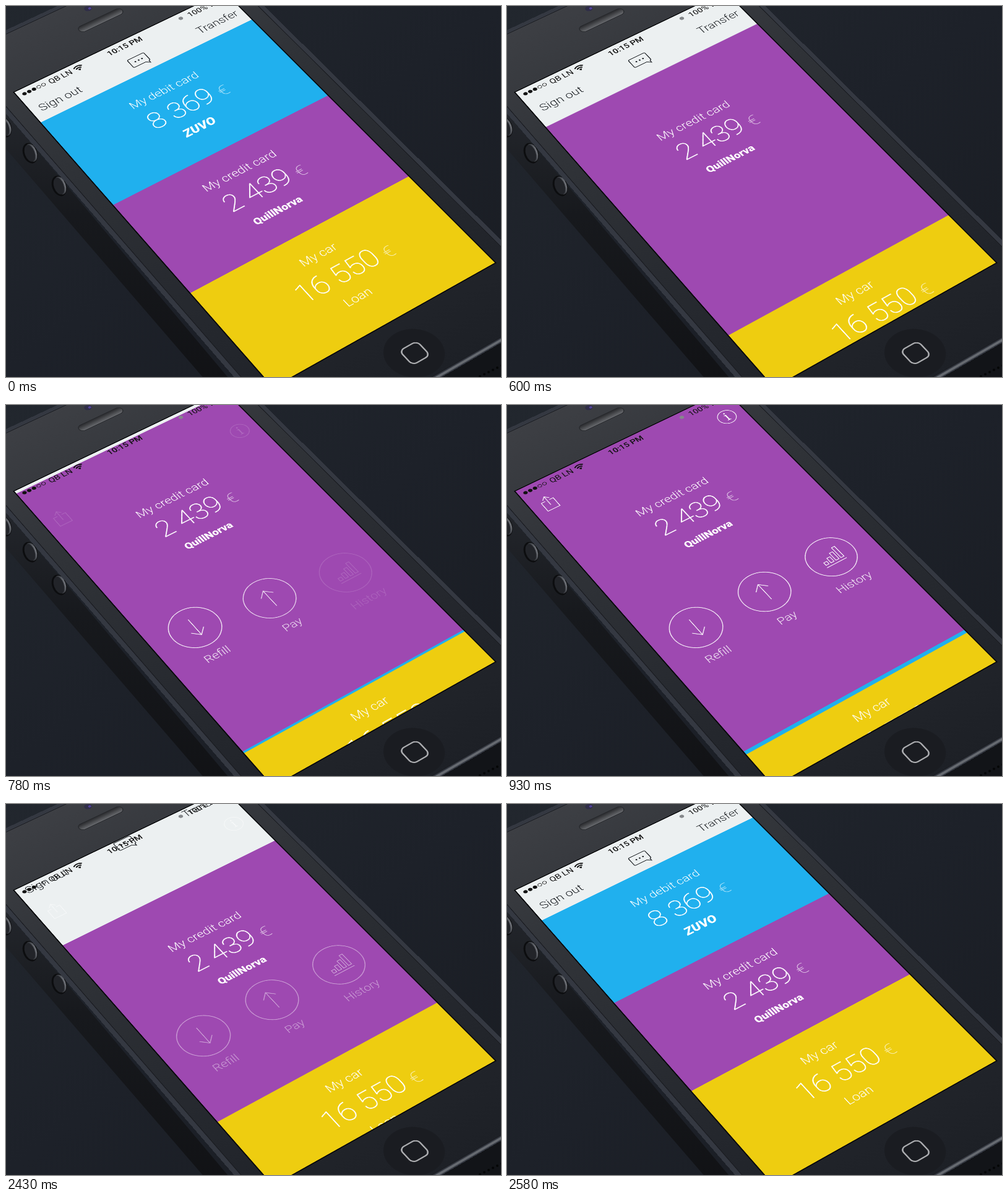
Recreate the animation shown at these times as an HTML page. Size 800x600 px, loop 3.12 s.

```html
<!DOCTYPE html>
<html lang="en">
<head>
<meta charset="utf-8">
<title>Card detail transition</title>
<style>
  html, body { margin: 0; width: 100%; height: 100%; overflow: hidden; background: #1c2027; }
  #stage { position: absolute; left: 0; top: 0; width: 100%; height: 100%; overflow: hidden; contain: strict; }
  svg { position: absolute; left: 0; top: 0; display: block; }
  /* Lays the flat 320 x 568 screen onto the tilted phone */
  #phone {
    overflow: visible;
    transform-origin: 0 0;
    transform: matrix3d(1.10234, -.51008, 0, .00012688, .6559, .7254, 0, -.00018523,
                        0, 0, 1, 0, 13.75, 139.5, 0, 1) scale(.5);
  }
  text { font-family: Roboto, Inter, sans-serif; font-size: 17px; font-weight: 300; }
  .mid { text-anchor: middle; }
  .light { fill: #fff; }
  .value { font-size: 38px; font-weight: 100; stroke: #fff; stroke-width: .45; }
  .euro { font-size: 24px; font-weight: 100; stroke: #fff; stroke-width: .3; opacity: .65; }
  .label { font-size: 16px; opacity: .9; }
  .status { font-size: 12px; font-weight: 400; }
  .line { fill: none; stroke: #fff; stroke-opacity: .9; }
  .dark { fill: none; stroke: #22262a; stroke-width: 1.1; }
</style>
</head>
<body>
<div id="stage">
<svg width="800" height="600" viewBox="0 0 800 600">
  <defs>
    <linearGradient id="table" x1="0" y1="0" x2="1" y2="1">
      <stop offset="0" stop-color="#22272e"/><stop offset=".5" stop-color="#1d2129"/><stop offset="1" stop-color="#191c22"/>
    </linearGradient>
    <linearGradient id="side" x1="0" y1="0" x2="0" y2="1">
      <stop offset="0" stop-color="#25282e"/><stop offset=".4" stop-color="#17191d"/><stop offset="1" stop-color="#111215"/>
    </linearGradient>
    <linearGradient id="metal" x1="0" y1="0" x2="1" y2="0">
      <stop offset="0" stop-color="#24262b"/><stop offset=".6" stop-color="#3c3f45"/><stop offset="1" stop-color="#777a80"/>
    </linearGradient>
  </defs>
  <path d="M0 0H800V600H0Z" fill="url(#table)"/>
  <path d="M-20 150L375 620H335L-20 208Z" fill="url(#side)"/>
  <path d="M660 620L800 540V600Z" fill="#121418"/>
  <g id="keys"></g>
  <g id="holes" fill="#050607"></g>
</svg>

<svg id="phone" width="640" height="1136" viewBox="0 0 320 568">
  <defs>
    <linearGradient id="face" x1="0" y1="0" x2="0" y2="1">
      <stop offset="0" stop-color="#3d3f44"/><stop offset=".3" stop-color="#303338"/>
      <stop offset=".75" stop-color="#24272d"/><stop offset="1" stop-color="#1d2026"/>
    </linearGradient>
    <linearGradient id="grille" x1="0" y1="0" x2="0" y2="1">
      <stop offset="0" stop-color="#27282b"/><stop offset="1" stop-color="#6a6c70"/>
    </linearGradient>
    <clipPath id="screen"><path d="M0 0H320V568H0Z"/></clipPath>
  </defs>
  <rect x="-25" y="-100" width="370" height="763" rx="58" fill="url(#face)" stroke="#343841" stroke-width="6"/>
  <rect x="-21.500" y="-96.500" width="363" height="756" rx="54" fill="none" stroke="#1b1d22"/>
  <path d="M60 663H290" stroke="#666a70" stroke-width="3"/>
  <rect x="126" y="-54" width="66" height="12" rx="6" fill="url(#grille)" stroke="#27292d"/>
  <circle cx="157" cy="-76" r="5" fill="#302e48"/>
  <circle cx="159" cy="-75" r="2" fill="#51429a"/>
  <circle cx="160" cy="620.500" r="35" fill="#1a1c21"/>
  <rect x="148" y="608.500" width="25" height="25" rx="6.500" fill="none" stroke="#b0b1b4" stroke-width="1.800"/>
  <path d="M-1.500 -1.500H321.500V569.500H-1.500Z" fill="#08090b"/>

  <g clip-path="url(#screen)">
    <path d="M0 0H320V568H0Z" fill="#ecf0f1"/>
    <g id="header" fill="#22262a">
      <text x="11" y="48.500">Sign out</text>
      <text x="312" y="47.500" text-anchor="end">Transfer</text>
      <path class="dark" d="M149 34H170Q172 34 172 36V48Q172 50 170 50V54L165 50H149Q147 50 147 48V36Q147 34 149 34Z"/>
      <circle cx="154.500" cy="42" r="1.200"/><circle cx="159.500" cy="42" r="1.200"/><circle cx="164.500" cy="42" r="1.200"/>
    </g>
    <g id="debit"></g>
    <g id="credit"></g>
    <path d="M0 507.500H320V568H0Z" fill="#20b0ee"/>
    <g id="creditText"></g>
    <g id="actions"></g>
    <g id="car"></g>
    <g id="status" fill="#111"></g>
  </g>
</svg>
</div>

<script>
const $ = id => document.getElementById(id);
const fill = (id, markup) => { $(id).innerHTML = markup; };
const move = (id, y, opacity = 1) => {
  $(id).setAttribute('transform', `translate(0 ${y})`);
  $(id).setAttribute('opacity', opacity);
};
const panel = (color, height) => `<path d="M0 0H320V${height}H0Z" fill="${color}"/>`;

const cardText = (title, value, euroX, titleY, valueY, footer) => `<g class="light">
  <text class="mid" x="156.500" y="${titleY}">${title}</text>
  <text class="mid value" x="156" y="${valueY}">${value}</text>
  <text class="euro" x="${euroX}" y="${valueY}">€</text>${footer}</g>`;
const brand = (name, style) => `<text class="mid" x="157.500" y="126.500" style="${style}">${name}</text>`;

fill('debit', panel('#20b0ee', 168) + cardText('My debit card', '8 369', 211, 47.5, 92.8,
  brand('ZUVO', 'font: italic 900 18px Roboto, sans-serif')));
fill('credit', panel('#9e49b1', 568));
fill('creditText', cardText('My credit card', '2 439', 211, 47.5, 92.8,
  brand('QuillNorva', 'font-size: 14.5px; font-weight: 800')));
fill('car', panel('#eecd10', 168) + '<g id="carText">' + cardText('My car', '16 550', 221, 44, 90.7,
  '<text class="mid" x="156.500" y="123">Loan</text>') + '</g>');

// Round buttons of the detail view, then its two corner icons
const arrow = dir => `<path class="line" d="M0 ${-15 * dir}V${14 * dir}M-9 ${5 * dir}L0 ${14 * dir}L9 ${5 * dir}"/>`;
const bars = [5, 9, 14, 20].map((h, i) => `M${-13.5 + 7.5 * i} 8v${-h}h4.5v${h}z`).join('');
const buttons = [
  ['Refill', arrow(1)],
  ['Pay', arrow(-1)],
  ['History', `<path class="line" d="M-15 12H15${bars}"/>`]
];
fill('actions', buttons.map(([name, icon], i) => `<g id="action${i}">
  <g transform="translate(${60 + 100 * i} 320)"><circle class="line" r="32"/>${icon}
  <text class="mid light label" x="-2" y="55.700">${name}</text></g></g>`).join('') + `<g id="corner">
  <path class="line" d="M21 37H15.500V53.500H33V37H27.500M24.300 46V29M19.500 34L24.300 29L29 34"/>
  <circle class="line" cx="294.500" cy="42" r="12.300"/>
  <text class="mid light" x="294.500" y="48.500" style="font: 19px 'Noto Serif', serif">i</text></g>`);

const signal = [0, 1, 2, 3, 4].map(i =>
  `<circle cx="${9 + 7 * i}" cy="9.500" r="2.500" stroke="#111" stroke-width=".7" ${i > 2 ? 'fill="none"' : ''}/>`).join('');
fill('status', signal + `
  <text class="status" x="45" y="14">QB LN</text>
  <path d="M83 8.200a8.500 8.500 0 0 1 12 0M85.200 10.700a5.400 5.400 0 0 1 7.600 0" fill="none" stroke="#111" stroke-width="1.700"/>
  <path d="M86.800 12.300a3.200 3.200 0 0 1 4.400 0L89 14.600Z"/>
  <text class="status mid" x="158.600" y="14.500" style="font-weight: 500">10:15 PM</text>
  <circle cx="246" cy="9" r="3" fill="#85888b"/>
  <text class="status" x="257" y="14">100%</text>
  <path d="M291 5.500H312V14H291Z"/>`);

// Side keys and speaker holes
fill('keys', [[-3, 196], [39, 238], [86, 291]].map(([x, y]) => `<g transform="translate(${x} ${y}) rotate(-20)">
  <ellipse rx="11.500" ry="17" fill="#0c0d0f"/><ellipse cx="2" rx="8.500" ry="15" fill="url(#metal)"/>
  <ellipse cx="-.5" rx="8" ry="14" fill="#222429"/></g>`).join(''));
fill('holes', [0, 1, 2, 3, 4, 5].map(i => `<circle cx="${766 + 7 * i}" cy="${599 - 3.5 * i}" r="2"/>`).join(''));

const LOOP = 3120, STEP = 30, OPEN = 510, OPENED = 930, CLOSE = 2280, CLOSED = 2580;
const clamp = x => Math.min(1, Math.max(0, x));

// 0 = list of cards, 1 = open credit card
function openness(t) {
  if (t < OPEN || t >= CLOSED) return 0;
  if (t < OPENED) {
    const x = .019 * (t - 476); // critically damped spring
    return 1 - (1 + x) * Math.exp(-x);
  }
  return (1 + Math.cos(Math.PI * clamp((t - CLOSE) / (CLOSED - CLOSE)))) / 2;
}

function draw(time) {
  const t = Math.floor(time % LOOP / STEP) * STEP;
  const s = openness(t), closing = t >= CLOSE;
  move('header', closing ? -66 * s : 0);
  move('debit', 64 + 504 * s);
  move('credit', 232 * (1 - s));
  move('creditText', 232 - 152 * s);
  move('car', 400 + 112.7 * s);
  move('carText', -8.5 * s);
  ['action0', 'action1', 'action2', 'corner'].forEach((id, i) => {
    const p = clamp((t - 615 - 75 * Math.min(i, 2)) / 165);
    const shown = closing ? s : 1 - (1 - p) ** 1.3;
    move(id, 36 * (1 - shown), closing ? shown : clamp(1.35 * shown));
  });
}

const start = performance.now();
function tick() {
  draw(performance.now() - start);
  requestAnimationFrame(tick);
}
tick();
</script>
</body>
</html>
```
